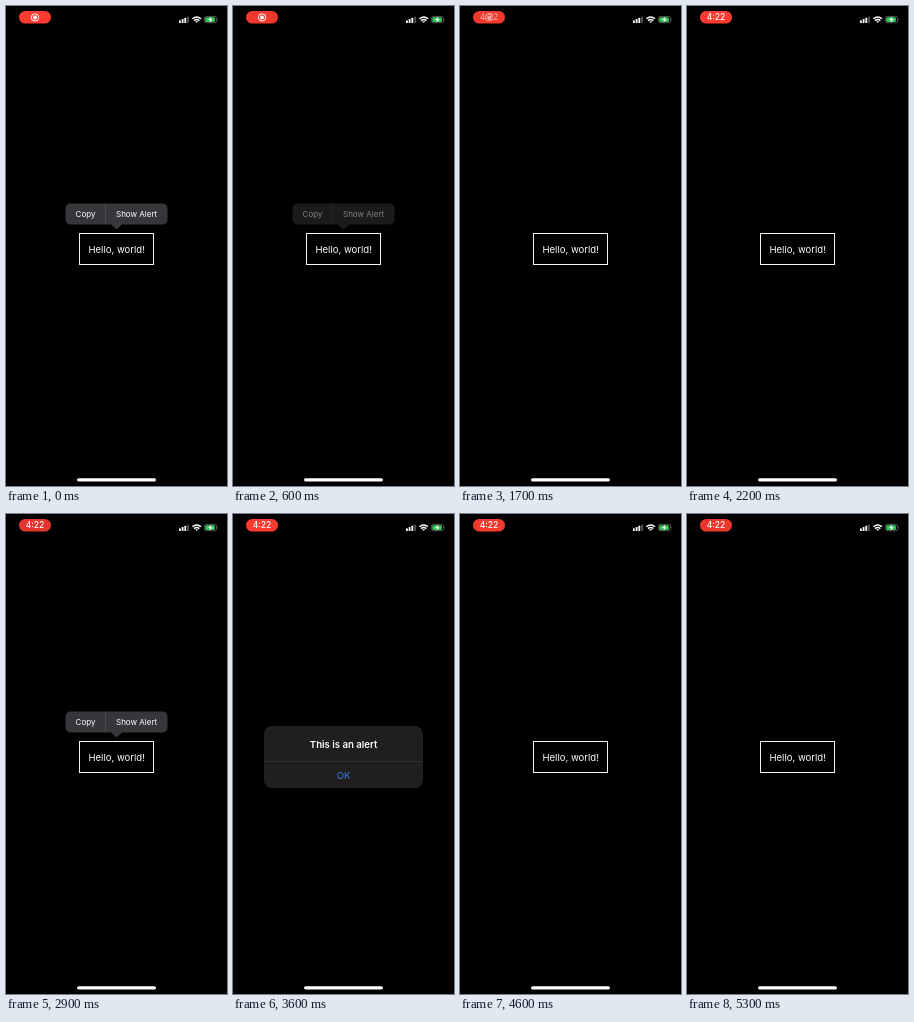
Animation of 221 by 480 pixels, one loop 5400 ms. Source, as an HTML page:

```html
<!DOCTYPE html>
<html lang="en">
<head>
<meta charset="utf-8">
<title>Context menu and alert</title>
<style>
  html, body { margin: 0; width: 100%; height: 100%; overflow: hidden; background: #000; }
  svg { display: block; width: 221px; height: 480px; }
  text { font-family: Inter, Roboto, sans-serif; fill: #fff; text-anchor: middle; }
</style>
</head>
<body>
<svg viewBox="0 0 221 480">
  <rect width="221" height="480" fill="#000"/>

  <rect id="pill" x="13" y="5" width="32" height="12.6" rx="6.3" fill="#ff3b30"/>
  <g id="record">
    <circle cx="29" cy="11.4" r="3.7" fill="none" stroke="#fff" stroke-width="1"/>
    <circle cx="29" cy="11.4" r="2" fill="#fff"/>
  </g>
  <text id="clock" x="29" y="14.4" font-size="8.5" font-weight="500">4:22</text>

  <g fill="#fff">
    <rect x="173" y="14.2" width="1.8" height="2.8" rx=".5"/>
    <rect x="175.7" y="13" width="1.8" height="4" rx=".5"/>
    <rect x="178.4" y="11.8" width="1.8" height="5.2" rx=".5"/>
    <rect x="181.1" y="10.5" width="1.8" height="6.5" rx=".5" fill="#555"/>
  </g>
  <g fill="none" stroke="#fff" stroke-width="1.4">
    <path d="M186.4 12.8Q190.7 9 195 12.8"/>
    <path d="M188 14.6Q190.7 12.3 193.4 14.6"/>
    <path d="M189.2 15.3h3l-1.5 1.7z" fill="#fff" stroke="none"/>
  </g>
  <rect x="198.4" y="10.4" width="12.2" height="6.4" rx="2" fill="none" stroke="#777" stroke-width=".7"/>
  <rect x="199.3" y="11.3" width="9.6" height="4.6" rx="1.2" fill="#34c759"/>
  <path d="M211.4 12.5q1.1 1.1 0 2.2z" fill="#777"/>
  <path d="M205.3 10.6l-3.2 3.4h2l-.7 2.8 3.3-3.6h-2z" fill="#fff"/>

  <rect x="73.5" y="227.5" width="74" height="31" fill="none" stroke="#f4f4e8"/>
  <text x="110.7" y="246.6" font-size="9.55">Hello, world!</text>

  <g id="menu">
    <path d="M64.5 197.5H156.5a5 5 0 0 1 5 5V213.500a5 5 0 0 1-5 5H116l-5.500 5-5.500-5H64.500a5 5 0 0 1-5-5V202.500a5 5 0 0 1 5-5z" fill="#37373b"/>
    <path d="M99.500 197.500v21" stroke="#5a5a5e" stroke-width=".6"/>
    <text x="79.500" y="211" font-size="8">Copy</text>
    <text x="130.600" y="211" font-size="8">Show Alert</text>
  </g>

  <g id="alert">
    <rect x="31" y="212" width="159" height="62" rx="8" fill="#201f1e"/>
    <path d="M31 247.500H190" stroke="#38383a" stroke-width=".7"/>
    <text x="110.600" y="233.500" font-size="9.600" font-weight="600">This is an alert</text>
    <text x="110.600" y="264.700" font-size="9.600" style="fill:#3b7df0">OK</text>
  </g>

  <rect x="71" y="472.200" width="79" height="3.200" rx="1.600" fill="#fff"/>
</svg>
<script>
const LOOP = 5400, STEP = 100;
const $ = id => document.getElementById(id);
const pill = $('pill'), record = $('record'), clock = $('clock'),
      menu = $('menu'), alertBox = $('alert');

// [time, value] pairs, linear in between
const menuFade  = [[0, 1], [500, 1], [700, 0], [2500, 0], [2700, 1], [3100, 1], [3300, 0]];
const alertFade = [[3200, 0], [3500, 1], [4200, 1], [4500, 0]];
const alertZoom = [[3200, 1.15], [3500, 1], [4500, 1]];
const clockFade = [[1600, 0], [1800, 1]];
const pillGlow  = [[0, 1], [1200, .89], [2200, 1], [2900, .89], [3600, 1], [4600, .96], [5300, .92]];

function at(keys, t) {
  const i = keys.findIndex(k => k[0] > t);
  if (i === 0) return keys[0][1];
  if (i < 0) return keys[keys.length - 1][1];
  const [t0, a] = keys[i - 1], [t1, b] = keys[i];
  return a + (b - a) * (t - t0) / (t1 - t0);
}

function show(el, opacity) {
  el.setAttribute('opacity', opacity);
}

function draw(now) {
  const t = Math.floor((now % LOOP) / STEP) * STEP;
  const time = at(clockFade, t), zoom = at(alertZoom, t);
  show(pill, at(pillGlow, t));
  show(clock, time);
  show(record, 1 - time);
  show(menu, at(menuFade, t));
  show(alertBox, at(alertFade, t));
  alertBox.setAttribute('transform',
    `translate(110.5 243) scale(${zoom}) translate(-110.5 -243)`);
}

const start = performance.now();
function tick() {
  draw(performance.now() - start);
  requestAnimationFrame(tick);
}
tick();
</script>
</body>
</html>
```
